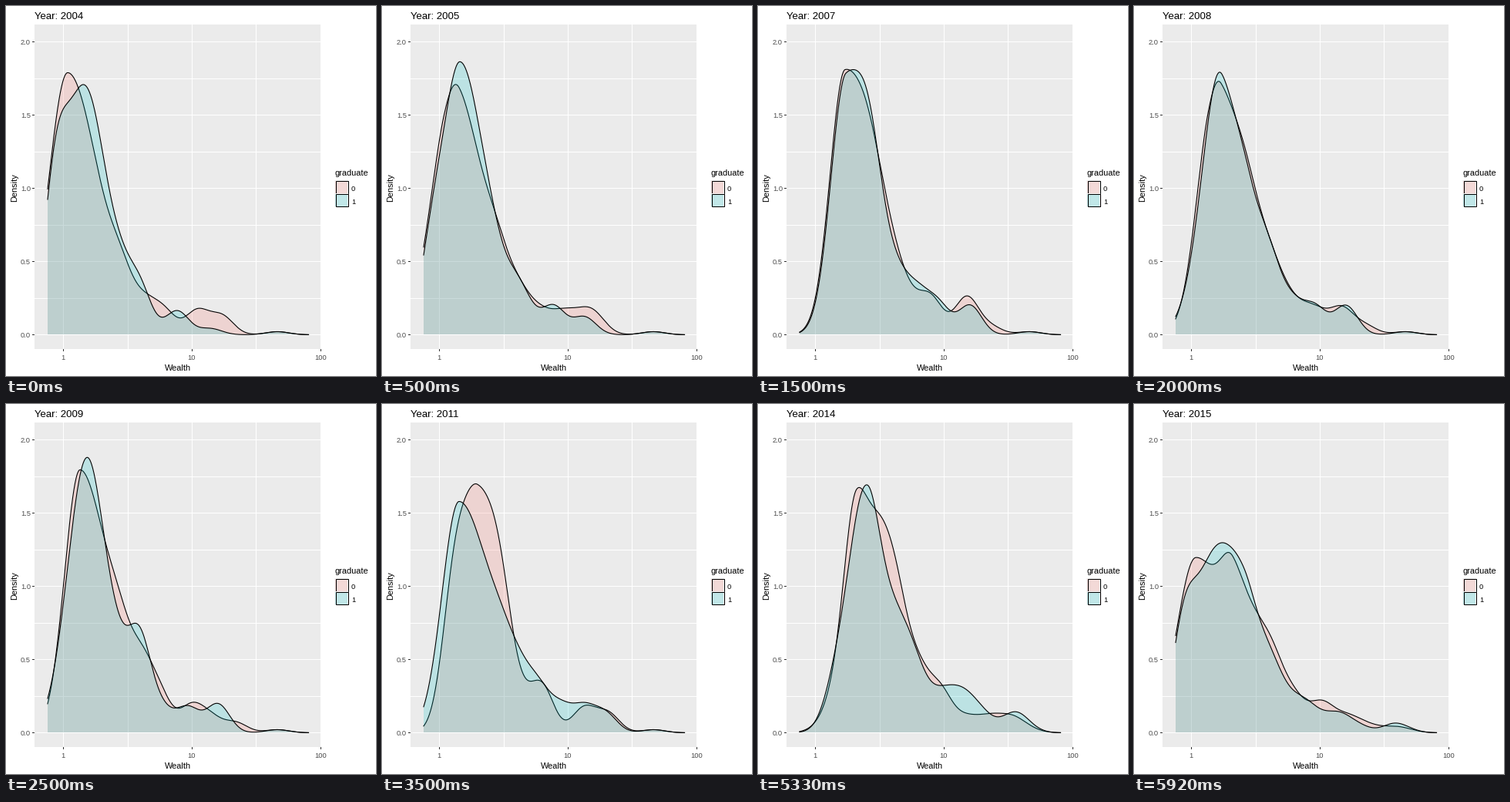
A matplotlib script for the animation above (8 s loop, 480 by 480 pixels).

```python
import numpy as np
import matplotlib.pyplot as plt
from matplotlib.animation import FuncAnimation
from matplotlib.patches import Polygon, Rectangle

plt.rcParams["font.family"] = "Liberation Sans"

SIZE, DPI = 480, 96
PT = 72 / DPI                     # points per pixel
LOOP, TICK = 8000, 20             # ms
FPS, STEPS, HOLD = 12, 6, 3       # steps per year, steps at rest before tweening
FIRST, LAST = 2004, 2015
LEFT, TOP, RIGHT, BOTTOM = 37, 24, 409, 445
BASE = 426.5                      # pixel row of zero density
FILLS = "#F8766D", "#00BFC4"
ALPHA = 0.2
BANDWIDTH = 15
XS = np.arange(54, 392.6, 0.5)


def bell(x, height, width=BANDWIDTH):
    return height * np.exp(-((XS - x) / width) ** 2 / 2)


def kde(peak, *bumps):
    """Skewed main lobe (x, height, left and right width) plus kernel bumps."""
    x, height, left, right = peak
    lobe = bell(x, height, np.where(XS < x, left, right))
    return lobe + sum(bell(*b) for b in bumps) + bell(352, 4)


# One pair of curves per surveyed year: group 0, group 1
curves = {}
curves[2004] = (
    kde((80, 340, 24, 40), (150, 36), (180, 29), (205, 28), (248, 31), (280, 24)),
    kde((103, 318, 26, 27), (64, 152), (150, 40), (174, 55), (222, 31), (265, 8)))
curves[2006] = (
    kde((100, 341, 22, 36), (151, 44), (176, 46), (202, 20), (230, 40), (268, 40)),
    kde((101, 383, 21, 32), (142, 40), (174, 34), (190, 36), (223, 42), (262, 38)))
curves[2007] = (
    kde((113, 342, 19.5, 46), (144, 17), (225, 35), (271, 48), (302, 10)),
    kde((114, 332, 19.5, 38), (145, 62), (184, 24), (208, 38), (234, 36), (275, 38)))
curves[2009] = (
    kde((96, 341, 20, 36), (148, 50), (176, 66), (200, 42), (240, 33), (265, 19), (298, 13)),
    kde((105, 356, 25, 24), (146, 50), (173, 118), (202, 27), (236, 32), (275, 37)))
curves[2011] = (
    kde((124, 304, 24, 29), (92, 108), (155, 60), (186, 14), (208, 56), (262, 32), (293, 25)),
    kde((100, 300, 22, 42), (155, 28), (178, 38), (203, 44), (232, 30), (262, 31), (290, 24)))
curves[2013] = (
    kde((118, 278, 22.5, 24), (156, 168), (182, 92), (207, 76), (236, 38), (282, 33), (325, 22)),
    kde((132, 297, 24, 27), (99, 92), (178, 58), (206, 52), (232, 40), (256, 36), (282, 24),
        (320, 24)))
curves[2015] = (
    kde((128, 315, 15, 18), (160, 160), (180, 165), (208, 68), (236, 58), (264, 20), (304, 25),
        (333, 17)),
    kde((142, 334, 22, 19), (176, 90), (196, 100), (218, 36), (244, 42), (268, 46), (292, 24),
        (336, 30)))
curves = {y: np.array(pair) for y, pair in curves.items()}
for y in range(FIRST, LAST):
    if y not in curves:
        curves[y] = (curves[y - 1] + curves[y + 1]) / 2

fig = plt.figure(figsize=(SIZE / DPI, SIZE / DPI), dpi=DPI, facecolor="white")
ax = fig.add_axes([0, 0, 1, 1])
ax.set(xlim=(0, SIZE), ylim=(SIZE, 0))
ax.axis("off")


def box(x, y, w, h, color, **kw):
    ax.add_patch(Rectangle((x, y), w, h, fc=color, lw=0, aa=False, **kw))


def label(x, y, s, px, color="black", ha="left", va="baseline", **kw):
    return ax.text(x, y, s, fontsize=px * PT, color=color, ha=ha, va=va, **kw)


# Panel, grid and axes: every second grid line carries a tick
box(LEFT, TOP, RIGHT - LEFT, BOTTOM - TOP, "#EBEBEB")
for i in range(5):
    x = int(74.7 + 83.35 * i)
    box(x, TOP, 1, BOTTOM - TOP, "white")
    if i % 2 == 0:
        box(x, BOTTOM, 1, 3, "#333333")
        label(x, 459, str(10 ** (i // 2)), 9.2, "#4D4D4D", "center")
for i in range(9):
    row = int(426 - 47.5 * i + 0.5)
    box(LEFT, row, RIGHT - LEFT, 1, "white")
    if i % 2 == 0:
        box(LEFT - 3, row, 3, 1, "#333333")
        label(32, row + 4, f"{i / 4:.1f}", 9.2, "#4D4D4D", "right")
label(223, 473, "Wealth", 11, ha="center")
label(16.5, 236, "Density", 11, ha="right", va="center", rotation=90)
title = label(37, 17, "", 13.2)

# Legend
label(426.5, 220, "graduate", 11)
for i, color in enumerate(FILLS):
    top = 226 + 17 * i
    box(426, top, 18, 18, "#F2F2F2")
    box(427, top + 1, 16, 16, color, alpha=ALPHA)
    ax.add_patch(Rectangle((427.5, top + 0.5), 16, 16, fill=False, ec="black", lw=PT))
    label(448, top + 14, str(i), 9.2)

# Density areas with their upper outlines
areas, lines = [], []
for i, color in enumerate(FILLS):
    areas.append(ax.add_patch(Polygon([(0, 0)], fc=color, alpha=ALPHA, lw=0, zorder=3 + i)))
    lines += ax.plot([], [], color="black", lw=1.1 * PT, zorder=3 + i)


def draw(i):
    step = min(int((TICK * i + 15) * FPS / 1000), (LAST - FIRST + 1) * STEPS - 1)
    n, phase = divmod(step, STEPS)
    now = FIRST + n
    after = now + 1 if now < LAST else FIRST
    mix = max(0, phase - HOLD) / (STEPS - HOLD)
    rows = BASE - (1 - mix) * curves[now] - mix * curves[after]
    for area, line, row in zip(areas, lines, rows):
        outline = np.column_stack([XS, row])
        area.set_xy(np.vstack([outline, (XS[-1], 426), (XS[0], 426)]))
        line.set_data(XS, row)
    title.set_text(f"Year: {now}")
    return [*areas, *lines, title]


anim = FuncAnimation(fig, draw, frames=LOOP // TICK, interval=TICK,
                     repeat=True, repeat_delay=0, blit=False)
plt.show()
```
